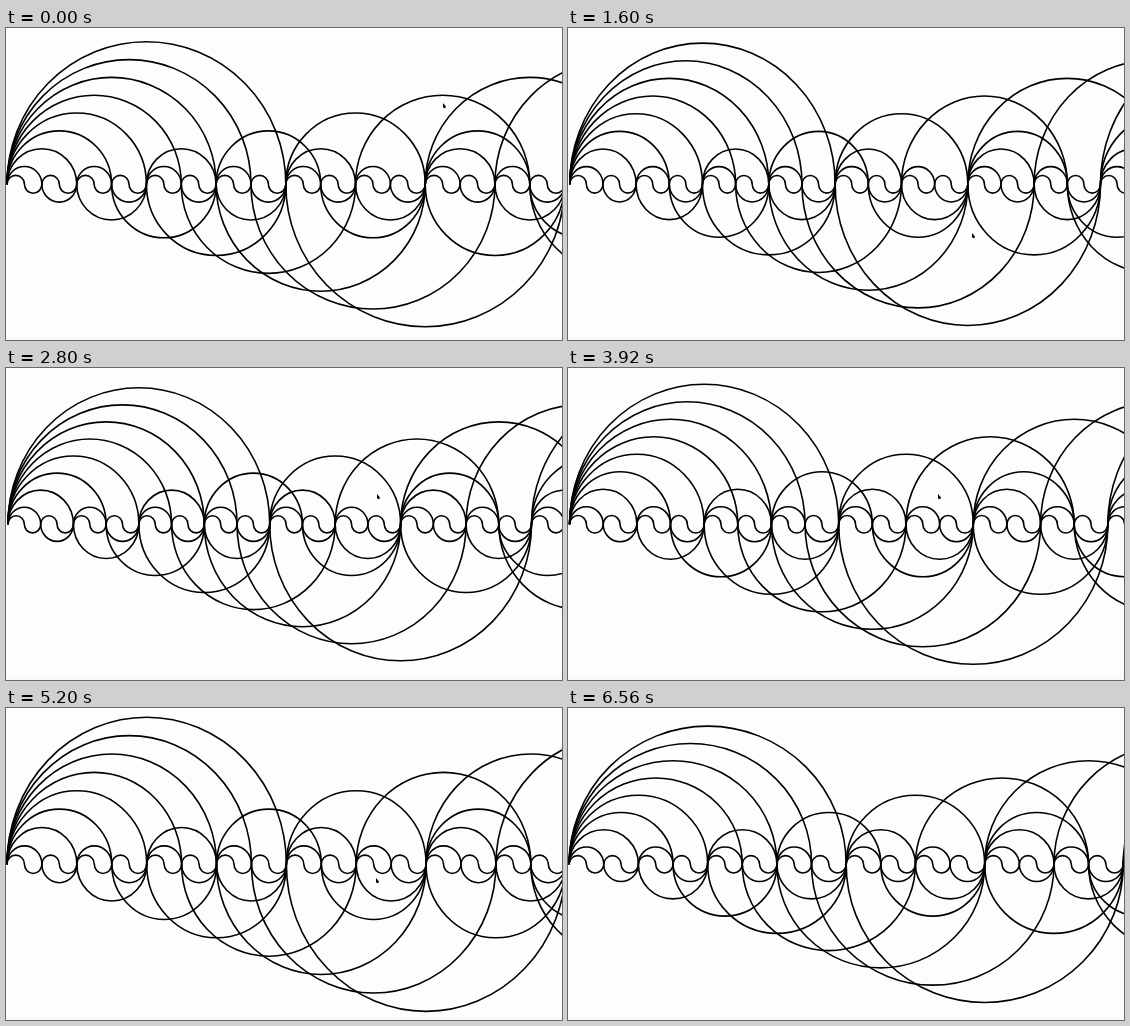
Animation, 556 px wide and 312 px high, one loop 6640 ms. Source, as an HTML page with a canvas:

```html
<!DOCTYPE html>
<html lang="en">
<head>
<meta charset="utf-8">
<title>Waves of semicircles</title>
<style>
  html, body { margin: 0; width: 100%; height: 100%; overflow: hidden; background: #fdfdfd; }
  canvas { display: block; width: 556px; height: 312px; }
</style>
</head>
<body>
<canvas id="stage" width="556" height="312"></canvas>
<script>
const WIDTH = 556, HEIGHT = 312, AXIS = 156.3;
const LOOP = 6640, STEP = 80, WAVES = 8;
const ctx = document.getElementById('stage').getContext('2d');

// Turning points of the tallest wave: [time, height].
const SWELL = [
  [0, 142.5], [900, 137.2], [2100, 143.6], [3240, 133],
  [3920, 140], [5120, 147.2], [6160, 137.2], [LOOP, 138.2]
];

// Resting points of the pointer: [time, x, y].
const POINTER = [
  [0, 437, 75], [800, 425, 21], [1600, 404, 205], [2800, 371, 126],
  [3920, 370, 126], [5200, 370, 170], [6400, 376, -8], [LOOP, 376, -8]
];

// Eases in and out between neighbouring points and returns their values.
function easeThrough(points, t) {
  const next = points.findIndex(([time]) => time > t);
  const [t0, ...from] = points[next - 1], [t1, ...to] = points[next];
  const s = (t - t0) / (t1 - t0), eased = s * s * (3 - 2 * s);
  return from.map((value, i) => value + (to[i] - value) * eased);
}

const unitWidth = t => 33.87 + 1.19 * Math.cos((t + 600) / 1000);

function drawWave(left, diameter, height) {
  const radius = diameter / 2;
  ctx.beginPath();
  ctx.moveTo(left, AXIS);
  for (let x = left, below = false; x < WIDTH; x += diameter, below = !below) {
    ctx.ellipse(x + radius, AXIS, radius, height, 0, Math.PI, below ? 0 : 2 * Math.PI, below);
  }
  ctx.stroke();
}

function drawPointer([x, y]) {
  ctx.beginPath();
  ctx.moveTo(x, y);
  ctx.lineTo(x + 3, y + 3.4);
  ctx.lineTo(x + 2.2, y + 5.2);
  ctx.lineTo(x, y + 4.4);
  ctx.fill();
}

function drawBackground() {
  const shade = ctx.createLinearGradient(0, HEIGHT - 4, 0, HEIGHT);
  shade.addColorStop(0, '#fdfdfd');
  shade.addColorStop(1, '#f8f8f8');
  ctx.fillStyle = shade;
  ctx.fillRect(0, 0, WIDTH, HEIGHT);
}

function draw(t) {
  const unit = unitWidth(t), left = 1 + (34.9 - unit) * 0.45;
  const [height] = easeThrough(SWELL, t);
  const rise = height / WAVES;
  drawBackground();
  ctx.strokeStyle = ctx.fillStyle = '#000';
  ctx.lineWidth = 1.6;
  drawWave(left, unit / 2, rise / 2);
  for (let n = 1; n <= WAVES; n++) drawWave(left, unit * n, rise * n);
  drawPointer(easeThrough(POINTER, t));
}

const start = performance.now();
function tick() {
  const elapsed = (performance.now() - start) % LOOP;
  draw(Math.floor(elapsed / STEP) * STEP);
  requestAnimationFrame(tick);
}
tick();
</script>
</body>
</html>
```
